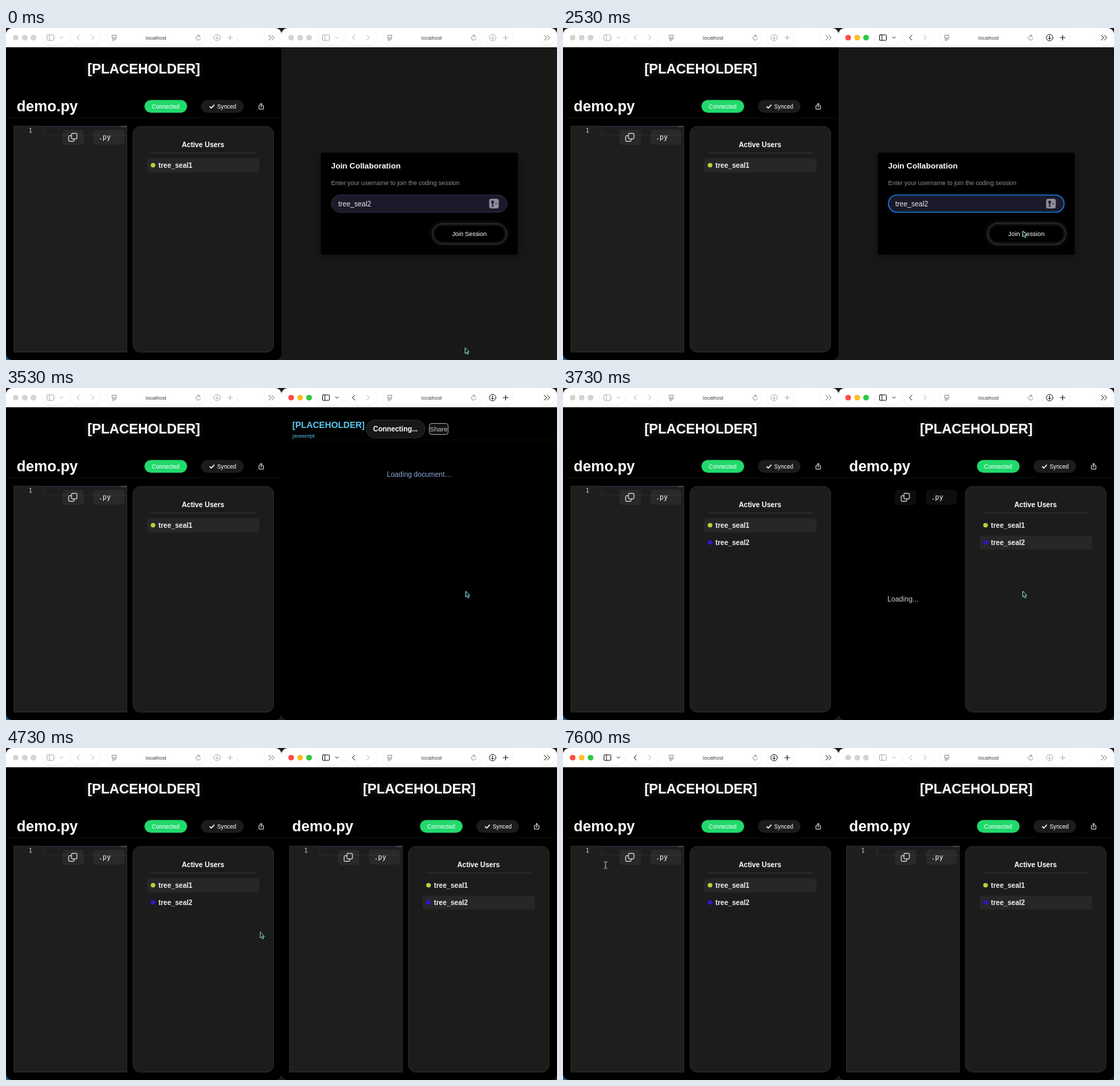
Write an HTML page that moves like this. It is 800 by 482 pixels and loops after 8 s.

```html
<!DOCTYPE html>
<html lang="en">
<head>
<meta charset="utf-8">
<title>Shared editor</title>
<style>
  html, body { margin: 0; width: 100%; height: 100%; overflow: hidden; background: #1c1c1e; }
  svg { display: block; width: 100%; height: 100%; }
  text { font-family: "Liberation Sans", Arial, sans-serif; fill: #fff; white-space: pre; }
  .b { font-weight: bold; }
  .m { font-family: "DejaVu Sans Mono", monospace; }
  .c { text-anchor: middle; }
  .line { fill: none; stroke: #fff; stroke-linecap: round; stroke-linejoin: round; }
  .tools { color: #b4b4b4; }
  .tools .line { stroke: currentColor; stroke-width: 1; }
  .tools .dim { stroke: #b8b8b8; }
  .tools .addr { stroke: #777; stroke-width: .8; }
  .tools .more { stroke: #777; }
  .tools circle { fill: #d3d3d3; }
  .tools .pill { fill: #fff; filter: drop-shadow(0 1px 2px #0001); }
  .on { color: #222; }
  .on .more { stroke: #222; }
  .on .red { fill: #ff4b44; }
  .on .amber { fill: #ffbd1f; }
  .on .green { fill: #28c93f; }
  .glow { filter: drop-shadow(0 0 4px #fff3); }
</style>
</head>
<body>
<script>
const text = (x, y, size, str, cls = '', fill = '#fff') =>
  `<text x="${x}" y="${y}" font-size="${size}" class="${cls}" style="fill:${fill}">${str}</text>`;
const box = (x, y, w, h, r, fill, rest = '') =>
  `<rect x="${x}" y="${y}" width="${w}" height="${h}" rx="${r}" fill="${fill}" ${rest}/>`;
const line = (d, cls = '', rest = '') => `<path class="line ${cls}" d="${d}" ${rest}/>`;
const group = (id, body, rest = '') => `<g id="${id}" ${rest}>${body}</g>`;

const users = [['tree_seal1', '#b0d93b'], ['tree_seal2', '#3018c8']];

const toolbar = id => group(id,
  box(0, 0, 400, 28, 0, '#fff') +
  [['red', 14], ['amber', 27.2], ['green', 40]].map(([c, x]) =>
    `<circle class="${c}" cx="${x}" cy="14" r="4.1"/>`).join('') +
  [[54, 35], [95, 42], [148, 140], [297, 38], [375, 21]].map(([x, w]) =>
    box(x, 4, w, 20, 10, '#fff', 'class="pill"')).join('') +
  line('M60.5 10h8q1 0 1 1v6q0 1-1 1h-8q-1 0-1-1v-6q0-1 1-1M63 10v8') +
  line('M78.5 13l2 2 2-2') +
  line('M106.5 10.5l-3.5 3.5 3.5 3.5') +
  line('M124 10.5l3.5 3.5-3.5 3.5', 'dim') +
  line('M154.5 10.5h5.5v4h-5.5zM154.5 16.2h5.5M154.5 18h3', 'addr') +
  text(218, 16.8, 7.6, 'localhost', 'c', '#444') +
  line('M281.6 12.4a3.2 3.2 0 1 0 .6 2.4M279 9.5l1.8 1.6-1.8 1.6', 'addr') +
  line('M311.2 14a4.7 4.7 0 1 1-9.4 0a4.7 4.7 0 1 1 9.4 0M306.5 11.5v4.8M304.7 14.7l1.8 1.8 1.8-1.8') +
  line('M325.5 10.5v7M322 14h7') +
  line('M381.5 10.5l3.5 3.5-3.5 3.5M386 10.5l3.5 3.5-3.5 3.5', 'more'),
  'class="tools"');

const editor = id => group(id,
  box(11.5, 142.5, 164, 328, 0, '#1e1e1e', 'stroke="#2a2a2a"') +
  box(55.5, 143, 120, 12.5, 0, 'none', 'stroke="#282828"') +
  line('M55 142.5h111', '', 'style="stroke:#1d3044"') +
  line('M167 143h8', '', 'style="stroke:#5c6470"') +
  text(35.5, 152.3, 9, '1', 'm c', '#c6c6c6'));

// One person's view; own is the index of the highlighted user.
const doc = (id, own) => group(id,
  box(0, 28, 400, 454, 0, '#000') +
  text(200, 65.8, 19.8, '[PLACEHOLDER]', 'b c glow') +
  text(15.6, 121, 21.6, 'demo.py', 'b') +
  box(0, 130, 400, 1, 0, '#0b0b0b') +
  box(201, 104.5, 62, 18.5, 9.25, '#22d96c') +
  text(231.8, 117, 8.35, 'Connected', 'c') +
  box(283, 104.5, 62, 18.5, 9.25, '#1c1c1c') +
  line('M296 114.3l2 2 4-4.4', '', 'stroke-width="1.5"') +
  text(306.5, 117, 8.3, 'Synced') +
  line('M368.8 112.8h-1.6v5h6.6v-5h-1.6M370.5 115v-5.2M368.8 111.2l1.7-1.7 1.7 1.7', '', 'stroke-width=".9"') +
  group(id + 'Wait', text(93.5, 310.3, 10.25, 'Loading...', 'c', '#ccc')) +
  editor(id + 'Editor') +
  box(82, 148, 31, 22, 5, '#fff', 'fill-opacity=".05"') +
  line('M94 156.5h-2q-1 0-1 1v6q0 1 1 1h6q1 0 1-1v-2M96 153h6q1 0 1 1v6q0 1-1 1h-6q-1 0-1-1v-6q0-1 1-1') +
  box(127, 147.5, 45, 22, 5, '#fff', 'fill-opacity=".05"') +
  text(134.5, 162, 9.7, '.py', 'm') +
  box(184.5, 143, 204, 327.5, 10, '#1c1c1c', 'stroke="#2b2b2b"') +
  text(286, 173.3, 10.2, 'Active Users', 'b c') +
  box(210, 181, 153, 1, 0, '#333') +
  users.map(([name, color], i) => group(id + 'User' + i,
    (i === own ? box(205, 189.5 + 25 * i, 163, 20, 4, '#272727') : '') +
    `<circle cx="213.5" cy="${199.3 + 25 * i}" r="3.3" fill="${color}"/>` +
    text(221.3, 203 + 25 * i, 10.1, name, 'b', '#ececf0'))).join(''));

const join = group('join',
  box(0, 28, 400, 454, 0, '#181818') +
  box(57, 181, 286, 148, 3, '#000', 'style="filter:drop-shadow(0 3px 6px #0006)"') +
  text(72, 203.5, 11.5, 'Join Collaboration', 'b') +
  text(72, 228.3, 8.95, 'Enter your username to join the coding session', '', '#8f8f8f') +
  box(72.5, 242.5, 255, 25, 12.5, '#1a1a2a', 'id="field"') +
  text(82.5, 258.5, 10.2, users[1][0], '', '#e8e8ec') +
  box(131, 249, 1, 12, 0, '#e8e8ec', 'id="fieldCaret"') +
  box(301.5, 248, 14, 14, 3, '#918e9c') +
  '<circle cx="306.5" cy="252.7" r="2.1" fill="#1a1a2a"/>' +
  box(305.7, 254, 1.7, 6, 0, '#1a1a2a') +
  line('M310.3 254.5l1.3 1.3 1.3-1.3', '', 'style="stroke:#1a1a2a"') +
  group('button',
    box(219, 284, 108, 29.5, 14.75, '#000', 'stroke="#3c3c3c" style="filter:drop-shadow(0 0 3px #fff2)"') +
    box(221, 286, 104, 25.5, 12.75, 'none', 'stroke="#161616" stroke-width="2"') +
    text(272.8, 301.5, 8.9, 'Join Session', 'c')));

const connecting = group('connecting',
  box(0, 28, 400, 454, 0, '#000') +
  text(15.8, 58.3, 12.7, '[PLACEHOLDER]', 'b', '#5cc8f0') +
  text(16, 72, 7.6, 'javascript', '', '#5cc8f0') +
  box(123, 46.5, 85.5, 26, 13, '#171717', 'stroke="#2b2b2b"') +
  text(165.5, 63, 10.25, 'Connecting...', 'b c') +
  box(214.5, 51.5, 27.5, 16, 3.5, '#111', 'stroke="#999"') +
  text(228.2, 63, 9.8, 'Share', 'c', '#ccc') +
  box(0, 75, 400, 1, 0, '#0b0b0b') +
  text(200, 129, 10.2, 'Loading document…', 'c', '#8aa8d4'));

const view = (x, body) => `<g transform="translate(${x})"><g clip-path="url(#frame)">${body}</g></g>`;

document.body.innerHTML = `<svg viewBox="0 0 800 482" preserveAspectRatio="none">
  <clipPath id="frame">${box(0, 0, 400, 482, 9, '#000')}</clipPath>
  ${box(0, 470, 12, 12, 0, '#1d5a94')}
  ${view(0, doc('left', 0) + box(55, 142.5, 1.6, 14, 0, '#aeafad', 'id="caret"') + toolbar('leftBar'))}
  ${view(400, doc('right', 1) + connecting + join + toolbar('rightBar'))}
  <path id="arrow" d="M0 0V8.6L2 6.8 3.4 9.9 4.9 9.2 3.5 6.3H6Z" fill="#101416" stroke="#8fe3e3" stroke-width=".9" stroke-linejoin="round"/>
  <path id="beam" class="line" d="M-2-5Q0-5 0-3.5Q0-5 2-5M0-3.5V3.5M-2 5Q0 5 0 3.5Q0 5 2 5" style="stroke:#a5c4bc"/>
</svg>`;

const el = id => document.getElementById(id);
const show = (id, on) => el(id).style.display = on ? '' : 'none';

// Pointer stops: time, x, y
const path = [
  [330, 666.5, 464], [620, 640, 400], [880, 686, 320], [1130, 673, 289],
  [1270, 549.5, 304.5], [1470, 545, 256], [1850, 545, 256],
  [2400, 667.5, 294.5], [4000, 667.5, 295], [4400, 409, 272], [4670, 409, 272],
  [4740, 363.3, 266.5], [5300, 100, 205], [5630, 100, 205], [6030, 61.8, 170]
];

function pointer(t) {
  const i = path.findIndex(p => p[0] > t);
  if (i < 1) return path.at(i).slice(1);
  const [t0, x0, y0] = path[i - 1], [t1, x1, y1] = path[i];
  const k = (t - t0) / (t1 - t0);
  return [x0 + (x1 - x0) * k, y0 + (y1 - y0) * k];
}

function draw(t) {
  const within = (a, b) => t >= a && t < b;
  const [x, y] = pointer(t);
  const typing = within(1470, 1950) || t >= 5200;
  for (const id of ['arrow', 'beam']) el(id).setAttribute('transform', `translate(${x} ${y})`);
  show('arrow', !typing);
  show('beam', typing);

  el('leftBar').classList.toggle('on', t >= 5430);
  el('rightBar').classList.toggle('on', within(1670, 5430));

  show('join', t < 3270);
  show('connecting', within(3270, 3670));
  show('leftUser1', t >= 3670);
  show('rightEditor', t >= 3930);
  show('rightWait', t < 3930);

  const focus = t >= 1870;
  el('field').setAttribute('stroke', focus ? '#1774cc' : '#2c2c46');
  el('field').setAttribute('stroke-width', focus ? 1.6 : 1);
  show('fieldCaret', within(1870, 2330) || within(2800, 3270));
  const hover = within(2270, 3270);
  el('button').setAttribute('transform', hover ? 'translate(273 298.7) scale(1.05) translate(-273 -298.7)' : '');
  show('caret', within(6070, 6600) || within(7070, 7600));
}

function tick(now) {
  draw(now % 8000);
  requestAnimationFrame(tick);
}
draw(0);
requestAnimationFrame(tick);
</script>
</body>
</html>
```
